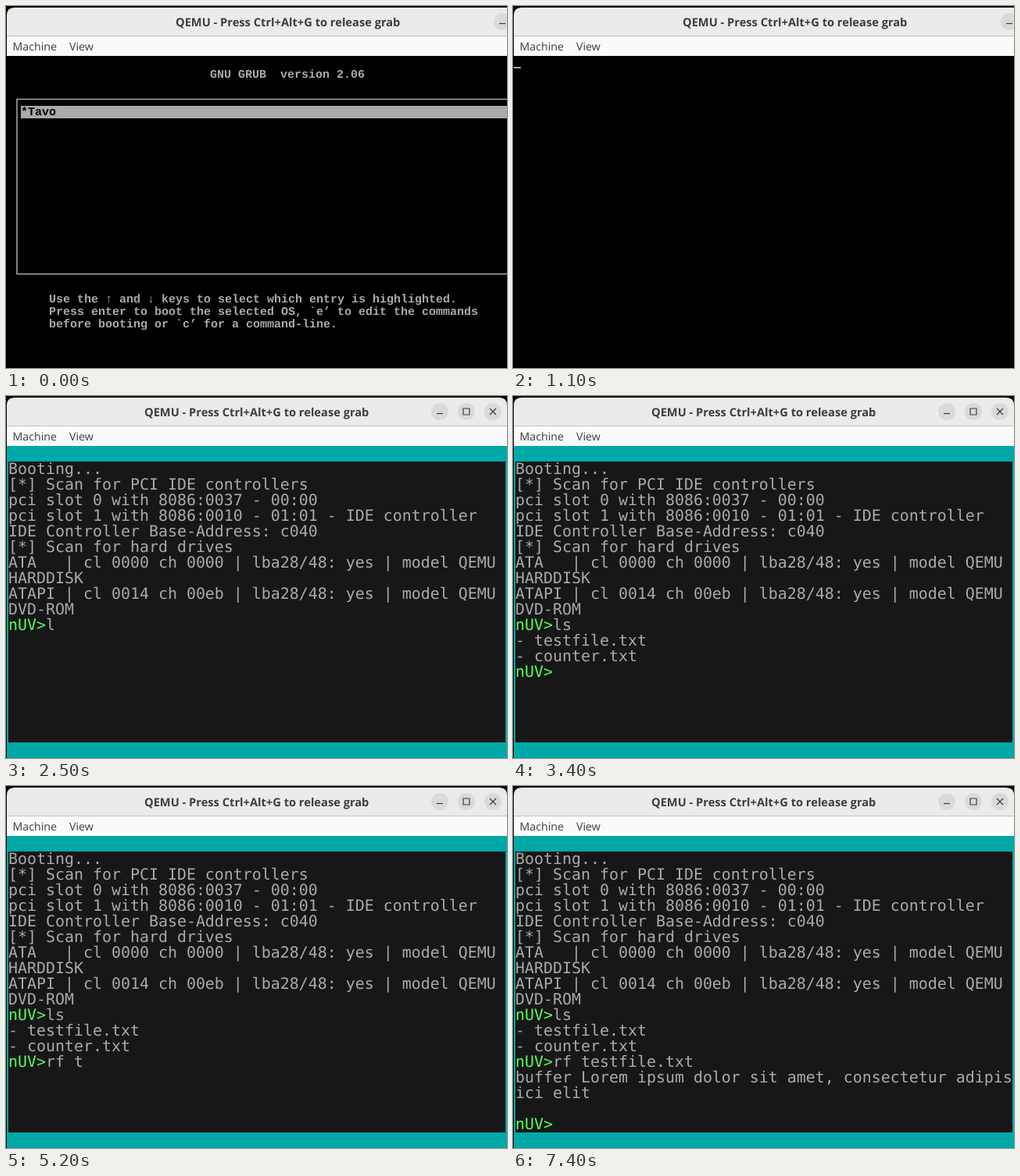
Recreate the animation shown at these times as an HTML page. Size 641x464 px, loop 8000 ms.

```html
<!DOCTYPE html>
<html lang="en">
<head>
<meta charset="utf-8">
<title>Booting in an emulator</title>
<style>
  html, body { margin: 0; width: 100%; height: 100%; overflow: hidden; background: #000; }
  svg { display: block; }
  text { white-space: pre; text-rendering: geometricPrecision; }
  .title { font: bold 14.67px "Open Sans", sans-serif; fill: #3d3d3d; }
  .menu { font: 14.2px "Open Sans", sans-serif; fill: #3d3d3d; }
  .grub { font: bold 15px "Liberation Mono", monospace; fill: #aaa; }
  .shell { font: 19.932px "DejaVu Sans Mono", monospace; fill: #aaa; }
  .prompt { fill: #5f5; }
  .icon { fill: none; stroke: #3d3d3d; stroke-width: 1.2; }
</style>
</head>
<body>
<svg width="641" height="464" viewBox="0 0 641 464">
  <defs>
    <g id="minimize">
      <circle r="11" fill="#dadada"/>
      <path class="icon" d="M-4 2.5h8"/>
    </g>
  </defs>

  <path id="bar" fill="#ebebeb"/>
  <path fill="#c4c4c4" d="M1 38h640v1H1z"/>
  <path fill="#fafafa" d="M1 39h640v25H1z"/>
  <text class="title" id="title" y="26">QEMU - Press Ctrl+Alt+G to release grab</text>
  <text class="menu" x="8.5" y="57">Machine</text>
  <text class="menu" x="81" y="57">View</text>

  <g id="wideButtons"><use href="#minimize" x="635" y="20"/></g>
  <g id="buttons">
    <use href="#minimize" x="555" y="20"/>
    <circle cx="589" cy="20" r="11" fill="#dadada"/>
    <path class="icon" d="M585 16h8v8h-8z"/>
    <circle cx="623" cy="20" r="11" fill="#dadada"/>
    <path class="icon" d="M619 16l8 8m0-8l-8 8"/>
  </g>

  <g id="grub" class="grub">
    <path d="M642 119.5H14V343.5H642" fill="none" stroke="#aaa" stroke-width="1.5"/>
    <path d="M19 128h622v16H19z"/>
    <text x="19" y="140" fill="#000" style="fill:#000">*Tavo</text>
    <text x="261" y="92">GNU GRUB  version 2.06</text>
    <text x="55" y="380">Use the ↑ and ↓ keys to select which entry is highlighted.</text>
    <text x="55" y="396">Press enter to boot the selected OS, `e’ to edit the commands</text>
    <text x="55" y="412">before booting or `c’ for a command-line.</text>
  </g>

  <path id="cursor" fill="#aaa" d="M1 78h9v2H1z"/>

  <g id="shell" class="shell">
    <path fill="#00a8a8" d="M1 64h640v400H1z"/>
    <path fill="#171717" d="M3 84h636v360H3z"/>
  </g>
</svg>
<script>
const LOOP = 8000;
const PROMPT = "nUV>";
const $ = id => document.getElementById(id);
const show = (node, on) => node.style.display = on ? "" : "none";

// Timed lines: [row, text, time]
const boot = `Booting...
[*] Scan for PCI IDE controllers
pci slot 0 with 8086:0037 - 00:00
pci slot 1 with 8086:0010 - 01:01 - IDE controller
IDE Controller Base-Address: c040
[*] Scan for hard drives
ATA   | cl 0000 ch 0000 | lba28/48: yes | model QEMU
HARDDISK
ATAPI | cl 0014 ch 00eb | lba28/48: yes | model QEMU
DVD-ROM`.split("\n").map((text, row) => [row, text, 1400]);

const lines = [
  ...boot,
  [10, PROMPT, 1400],
  [11, "- testfile.txt", 3400],
  [12, "- counter.txt", 3400],
  [13, PROMPT, 3400],
  [14, "buffer Lorem ipsum dolor sit amet, consectetur adipis", 7400],
  [15, "ici elit", 7400],
  [17, PROMPT, 7400]
];

// Typed commands with the time of each key press
const commands = [
  [10, "ls", [2500, 2900]],
  [13, "rf testfile.txt", [4600, 4700, 4800, 5200, 5400, 5600, 5700,
    6000, 6100, 6300, 6500, 6700, 6800, 7000, 7100]]
];

function addText(row, column, text = "") {
  const node = document.createElementNS("http://www.w3.org/2000/svg", "text");
  node.setAttribute("x", 3 + 12 * column);
  node.setAttribute("y", 100 + 20 * row);
  node.textContent = text;
  if (text === PROMPT) node.setAttribute("class", "prompt");
  $("shell").append(node);
  return node;
}

const output = lines.map(([row, text, time]) => ({ node: addText(row, 0, text), time }));
const typing = commands.map(([row, text, keys]) => ({ node: addText(row, 4), text, keys }));

function draw(t) {
  const running = t >= 1400;
  $("bar").setAttribute("d", running
    ? "M1 38V12Q1 2 11 2H631Q641 2 641 12V38z"
    : "M1 38V12Q1 2 11 2H641V38z");
  $("title").setAttribute("x", running ? 177 : 217);
  show($("wideButtons"), !running);
  show($("buttons"), running);
  show($("grub"), t < 800);
  show($("cursor"), t >= 800 && t < 900 || t >= 1100 && !running);
  show($("shell"), running);
  for (const { node, time } of output) show(node, t >= time);
  for (const { node, text, keys } of typing)
    node.textContent = text.slice(0, keys.filter(key => t >= key).length);
}

const start = performance.now();
function tick() {
  draw((performance.now() - start) % LOOP);
  requestAnimationFrame(tick);
}
tick();
</script>
</body>
</html>
```
